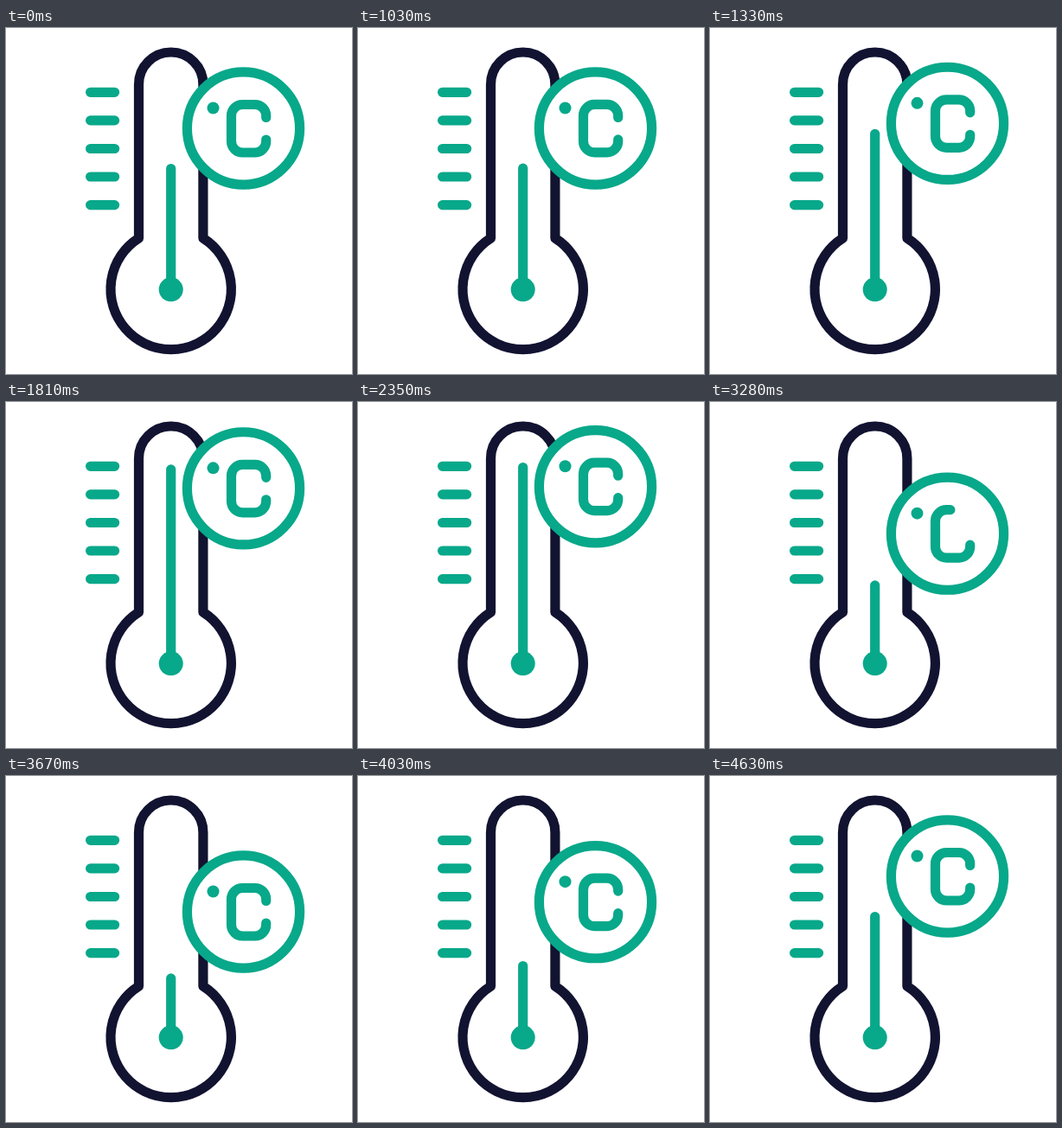
Recreate the animation shown at these times as an HTML page. Size 400 px wide and 400 px high, loop 4.66 s.

```html
<!DOCTYPE html>
<html lang="en">
<head>
<meta charset="utf-8">
<title>Thermometer</title>
<style>
  html, body { margin: 0; width: 100%; height: 100%; overflow: hidden; background: #fff; }
  svg { display: block; width: 100%; height: 100%; }
  .line { fill: none; stroke-width: 11.2; stroke-linecap: round; stroke-linejoin: round; }
  .navy { stroke: #121331; }
  .green { stroke: #08a88a; }
  .dot { fill: #08a88a; }
</style>
</head>
<body>
<svg viewBox="0 0 400 400">
  <path class="line green" d="M97.6 74.3h28M97.6 106.9h28M97.6 139.5h28M97.6 172h28M97.6 204.6h28"/>
  <path class="line navy" d="M153.5 243V65.2a37.2 37.2 0 0 1 74.4 0V243A69.7 69.7 0 1 1 153.5 243Z"/>
  <path class="line green" id="mercury"/>
  <circle class="dot" cx="190.7" cy="302.3" r="14"/>
  <g id="badge">
    <circle class="line green" r="65.1" style="fill:#fff"/>
    <circle class="dot" cx="-35" cy="-23.5" r="7"/>
    <path class="line green" id="letter" d="M26.2 13V15a13 13 0 0 1 -13 13H-1a13 13 0 0 1 -13 -13V-14.5a13 13 0 0 1 13 -13H13.2a13 13 0 0 1 13 13V-12.5"/>
  </g>
</svg>
<script>
const LOOP = 4660;
const mercury = document.getElementById('mercury');
const badge = document.getElementById('badge');
const letter = document.getElementById('letter');
const length = letter.getTotalLength();

// Moves as [start, end, from, to]
const mercuryMoves = [[1000, 2000, 162.5, 75.5], [2625, 3700, 75.5, 234], [3870, 4640, 234, 162.5]];
const badgeMoves = [[1000, 2270, 116, 97.7], [2575, 3597, 97.7, 157], [3833, 4640, 157, 116]];
const eraseMoves = [[2596, 3046, 0, 1]];
const drawMoves = [[3046, 3496, 0, 1]];

// Cubic Bezier (.3, 0, .3, 1)
function ease(x) {
  if (x <= 0) return 0;
  if (x >= 1) return 1;
  let lo = 0, hi = 1;
  for (let i = 0; i < 24; i++) {
    const s = (lo + hi) / 2;
    if (0.9 * s * (1 - s) + s * s * s < x) lo = s; else hi = s;
  }
  return lo * lo * (3 - 2 * lo);
}

function valueAt(moves, t) {
  let value = moves[0][2];
  for (const [start, end, from, to] of moves) {
    if (t >= start) value = from + (to - from) * ease((t - start) / (end - start));
  }
  return value;
}

function trim(from, to) {
  const visible = (to - from) * length;
  letter.style.visibility = visible > 0.05 ? 'visible' : 'hidden';
  letter.setAttribute('stroke-dasharray', visible > length - 0.05
    ? 'none' : `0 ${from * length} ${visible} ${length * 2}`);
  // A leading zero dash would paint a round cap, so shift past it
  if (visible <= length - 0.05) {
    letter.setAttribute('stroke-dasharray', `${visible} ${length * 2}`);
    letter.setAttribute('stroke-dashoffset', -from * length);
  } else {
    letter.setAttribute('stroke-dashoffset', 0);
  }
}

function render(t) {
  mercury.setAttribute('d', `M190.7 302.3V${valueAt(mercuryMoves, t)}`);
  badge.setAttribute('transform', `translate(274.5 ${valueAt(badgeMoves, t)})`);
  if (t < 3046) trim(valueAt(eraseMoves, t), 1);
  else trim(0, valueAt(drawMoves, t));
}

const begin = performance.now();
function frame(now) {
  render(Math.max(0, now - begin) % LOOP);
  requestAnimationFrame(frame);
}
render(0);
requestAnimationFrame(frame);
</script>
</body>
</html>
```
